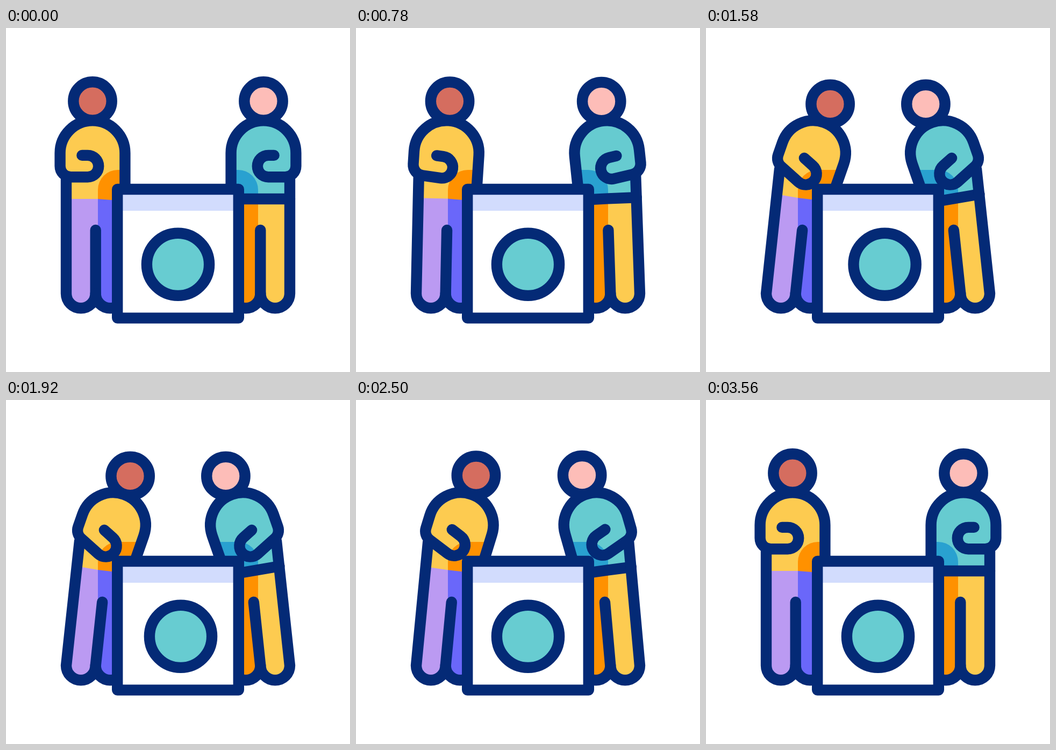
Recreate the animation shown at these times as an HTML page with a canvas. Size 640x640 px, loop 3600 ms.

```html
<!DOCTYPE html>
<html>
<head>
<meta charset="utf-8">
<style>
html, body { margin: 0; width: 100%; height: 100%; overflow: hidden; background: #fff; }
canvas { display: block; }
</style>
</head>
<body>
<canvas width="640" height="640"></canvas>
<script>
const ctx = document.querySelector('canvas').getContext('2d');
const PI = Math.PI, LOOP = 3600, NAVY = '#042a76';
const clamp = u => Math.min(1, Math.max(0, u));
const quint = u => u < .5 ? 16 * u ** 5 : 1 - 16 * (1 - u) ** 5;
const sine = u => (1 - Math.cos(PI * u)) / 2;
const part = (t, from, to) => clamp((t - from) / (to - from));

const left = {
  head: '#d56d5f', top: ['#fdcb50', '#ff9100'], legs: ['#bb9af2', '#6a67fa'],
  lean: t => quint(part(t, 78, 1781)) - quint(part(t, 1835, 3635))
};
const right = {
  head: '#fdbdb8', top: ['#66cbd0', '#29a1d0'], legs: ['#fdcb50', '#ff9100'], belt: true,
  lean: t => quint(part(t, 3, 1709)) - quint(part(t, 1760, 3600))
};

function disc(x, y, r, fill) {
  ctx.beginPath();
  ctx.arc(x, y, r, 0, 2 * PI);
  ctx.fillStyle = fill;
  ctx.fill();
  ctx.stroke();
}

function line(...points) {
  ctx.beginPath();
  points.forEach(p => ctx.lineTo(...p));
  ctx.stroke();
}

function person(look, p) {
  const tilt = 19.2 * p * PI / 180, bend = 42 * p * PI / 180;
  const cx = 161 + 38.3 * p, cy = 232.7;
  const onTorso = (x, y) => [
    cx + x * Math.cos(tilt) - y * Math.sin(tilt),
    cy + x * Math.sin(tilt) + y * Math.cos(tilt)
  ];
  const elbow = onTorso(-40.2, 24.4);
  const along = (d, n) => [
    elbow[0] + d * Math.cos(bend) + n * Math.sin(bend),
    elbow[1] + d * Math.sin(bend) - n * Math.cos(bend)
  ];
  const reach = 31.2 + 12 * p, finger = 10.6 + 11 * p;

  function outline() {
    ctx.beginPath();
    ctx.moveTo(112 + 25 * p, 277 - 15 * p);
    ctx.arc(139.3, 494, 27.3, PI, 0, true);
    ctx.arc(193.9, 494, 27.3, PI, 0, true);
    ctx.lineTo(...onTorso(60.4, 70));
    ctx.arc(cx, cy, 60.4, tilt, tilt - PI, true);
    ctx.arc(...elbow, 20.2, PI + tilt, PI / 2 + bend, true);
  }

  const waist = [
    [112 + 19.5 * p, 318 - 8.7 * p],
    [171, 318 - 2 * p],
    [221, look.belt ? 318 + 6.5 * p : 322]
  ];
  function paint(tone) {
    ctx.fillStyle = look.top[tone];
    ctx.fillRect(0, 0, 320, 640);
    ctx.beginPath();
    ctx.moveTo(60, waist[0][1]);
    waist.forEach(w => ctx.lineTo(...w));
    ctx.lineTo(320, waist[2][1]);
    ctx.lineTo(320, 640);
    ctx.lineTo(60, 640);
    ctx.fillStyle = look.legs[tone];
    ctx.fill();
  }

  ctx.save();
  outline();
  ctx.closePath();
  ctx.clip();
  paint(0);
  // shadow beside the machine stays put while the body moves
  ctx.beginPath();
  ctx.moveTo(171, 640);
  ctx.arc(208, 301, 37, PI, 1.5 * PI);
  ctx.lineTo(320, 264);
  ctx.lineTo(320, 640);
  ctx.clip();
  paint(1);
  ctx.restore();

  if (look.belt) line(...waist);
  line([166.7, 494], [166.7 + 12.5 * p, 376]);
  outline();
  ctx.arc(...along(reach, 0), 20.2, PI / 2 + bend, bend - PI / 2, true);
  ctx.lineTo(...along(reach - finger, 20.2));
  ctx.stroke();
  disc(...onTorso(0, -96.7), 35.7, look.head);
}

function machine(t) {
  ctx.fillStyle = '#fff';
  ctx.fillRect(207, 300, 226, 240);
  ctx.fillStyle = '#d2dcfd';
  ctx.fillRect(207, 300, 226, 40);
  ctx.strokeRect(207.2, 300, 225.6, 239.6);
  const shift = -14 * sine(part(t, 780, 960)) + 28 * sine(part(t, 960, 1400))
    - 14 * sine(part(t, 1400, 2280));
  disc(320 + shift, 439.8, 58.1, '#67ccd1');
}

function draw(now) {
  const t = now % LOOP;
  ctx.fillStyle = '#fff';
  ctx.fillRect(0, 0, 640, 640);
  ctx.strokeStyle = NAVY;
  ctx.lineWidth = 20.4;
  ctx.lineCap = ctx.lineJoin = 'round';
  person(left, left.lean(t));
  ctx.save();
  ctx.translate(640, 0);
  ctx.scale(-1, 1);
  person(right, right.lean(t));
  ctx.restore();
  machine(t);
}

const start = performance.now();
function tick() {
  draw(performance.now() - start);
  requestAnimationFrame(tick);
}
tick();
</script>
</body>
</html>
```
